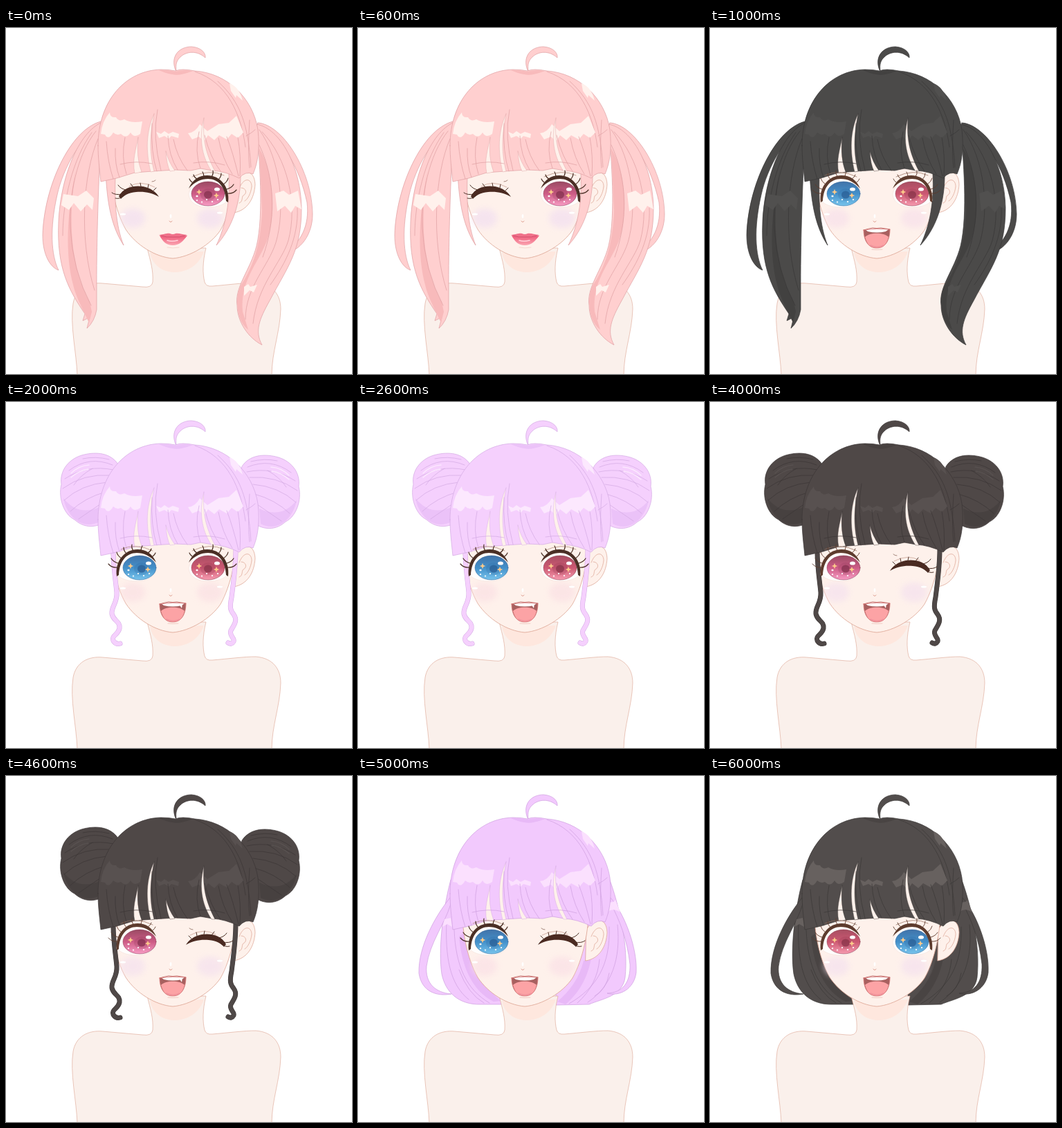
Recreate the animation shown at these times as an HTML page. Size 500 by 500 pixels, loop 7 s.

```html
<!DOCTYPE html>
<html lang="en">
<head>
<meta charset="utf-8">
<title>Character looks</title>
<style>
html, body { margin: 0; width: 100%; height: 100%; overflow: hidden; background: #fff; }
svg { display: block; width: 500px; height: 500px; }
.look { visibility: hidden; }
</style>
</head>
<body>
<svg id="stage" viewBox="0 0 500 500" stroke-linecap="round" stroke-linejoin="round"></svg>
<script>
const STEP = 1000;
const SKIN = '#fef1eb', EDGE = '#dca391';

// base, shade, line, shine
const HAIR = {
  pink: ['#ffcfcf', '#f8babb', '#dfa0a3', '#fff1ec'],
  black: ['#4b4a49', '#424140', '#383737', '#51504f'],
  lilac: ['#f5d0fd', '#ebc2f8', '#d3aae3', '#fce8fe'],
  blue: ['#b5daff', '#a3cffa', '#8ab5dd', '#d6ebff'],
  brown: ['#4f4847', '#474140', '#3b3635', '#585150'],
  violet: ['#f2c9fd', '#e8b9f7', '#cea0e0', '#fbe0fe'],
  soft: ['#524d4c', '#494443', '#3c3837', '#67615f']
};
// top, middle, bottom, pupil
const IRIS = {
  pink: ['#9a4a63', '#cd5c86', '#f79cc4', '#84324f'],
  red: ['#a84e62', '#cc5872', '#f69bb0', '#883449'],
  blue: ['#4173a9', '#4390ca', '#78c4ec', '#2b5f96'],
  purple: ['#7c4c98', '#a96bc4', '#e0b0f3', '#66387f']
};
const LOOKS = [
  { hair: 'pink', style: 'tails', left: '', right: 'pink', cheek: '#f3e0f0' },
  { hair: 'black', style: 'tails', left: 'blue', right: 'red', open: 1, fine: 1, cheek: '#f8e1ea' },
  { hair: 'lilac', style: 'buns', left: 'blue', right: 'red', open: 1, fang: 1, cheek: '#fbe1e4' },
  { hair: 'blue', style: 'bob', left: 'red', right: 'purple', cheek: '#fbe1e6' },
  { hair: 'brown', style: 'buns', left: 'pink', right: '', open: 1, fang: 1, fine: 1, cheek: '#f5e2ee' },
  { hair: 'violet', style: 'bob', left: 'blue', right: '', open: 1, cheek: '#fbe1e6' },
  { hair: 'soft', style: 'bob', left: 'red', right: 'blue', open: 1, fine: 1, cheek: '#f5e2ee' }
];

const shape = (d, fill, stroke = 'none', w = .7) =>
  `<path d="${d}" fill="${fill}" stroke="${stroke}" stroke-width="${w}"/>`;
const line = (d, stroke, w = .7) => shape(d, 'none', stroke, w);
const oval = (x, y, rx, ry, fill, extra = '') =>
  `<ellipse cx="${x}" cy="${y}" rx="${rx}" ry="${ry}" fill="${fill}" ${extra}/>`;
const flip = (s, on, axis = 481) => on ? `<g transform="matrix(-1 0 0 1 ${axis} 0)">${s}</g>` : s;
const star = (x, y, r) =>
  shape(`M${x},${y - r}l1.2,${r - 1.2} ${r - 1.2},1.2 ${1.2 - r},1.2 -1.2,${r - 1.2} -1.2,${1.2 - r} ${1.2 - r},-1.2 ${r - 1.2},-1.2z`, '#fbc98a');

function body() {
  return shape('M103,502C102,470 92,428 97,398C101,376 119,367 140,369L197,374Q211,376 212,367C213,350 209,338 204,318H289C284,338 284,355 287,367Q289,374 298,373C322,371 344,368 361,368C386,370 397,386 397,406C396,440 384,468 384,502Z', '#faf0eb', EDGE, .6) +
    shape('M208,325C213,346 229,353 245,353C264,352 279,342 286,323Z', '#fee7de');
}

function face(look) {
  const ear = shape('M330,222C340,205 359,202 360,226C359,246 349,264 329,267Z', SKIN, EDGE) +
    line('M337,232C344,214 355,218 355,229C354,239 349,248 345,250M340,231C347,231 349,239 343,242C340,244 343,251 337,253', EDGE);
  const cheek = (x, rx) => oval(x, 275, rx, 14, look.cheek, 'filter="url(#blur)" opacity=".75"');
  return ear +
    shape('M150,180C150,225 157,262 173,291C188,314 216,331 241,333C266,331 296,313 310,292C325,265 334,225 334,180Z', SKIN, EDGE, .8) +
    cheek(183, 18) + cheek(295, 19) +
    oval(169, 269, 4, 1.5, '#fff') + oval(309, 267, 4, 1.5, '#fff') +
    oval(238, 272, 1.4, 3, '#fff') + line('M236,279Q238,282 240,279', '#e0a294', 1);
}

function mouth(look) {
  if (!look.open) {
    return shape('M222,300Q241,304 262,300C255,309 250,314 241,314C232,314 227,309 222,300Z', 'url(#lip)') +
      shape('M221,299C230,298 233,296 237,297Q241,299 245,297C250,296 255,299 262,299Q252,304 241,303Q230,304 221,299Z', '#f0718a') +
      line('M224,300Q232,303 241,302Q251,303 259,300', '#cf4a68', .9) +
      line('M233,307Q239,309 248,307', '#ffd6de', 1.6) +
      line('M233,317Q241,319 250,317', '#f1cfc5');
  }
  const d = 'M222,292Q241,289 260,291C260,304 255,318 241,318C228,318 222,306 222,292Z';
  return shape(d, '#a8605f') +
    shape('M224,302C231,295 251,295 258,302C255,314 250,318 241,318C232,318 227,313 224,302Z', '#fca3a5') +
    shape('M224,291Q241,287 258,291L254,294Q241,297 228,294Z', '#fff') +
    (look.fang ? shape('M250,292L255,291 254,298Z', '#fff') : '') +
    line('M222,292Q229,290 235,289Q241,290 247,289Q254,290 260,291', '#c0625f', 1) +
    line(d, '#d87a7a', .8) +
    line('M232,314Q241,319 251,314', '#f0929b', 1.6) + line('M234,320Q241,321 249,320', '#eab9b0');
}

function iris(color, x, pupil) {
  const dark = IRIS[color][3];
  const dots = [-16, -9, -2, 6, 14].map((dx, i) => oval(x + dx, 249 + [0, 2.5, -1, 2, -1][i], 1.2, 1.1, '#fff')).join('');
  return oval(x, 239.5, 24, 17.5, `url(#${color}Iris)`, `stroke="${dark}" stroke-width=".5"`) +
    oval(pupil, 241, 11, 9, dark, 'opacity=".2"') + oval(pupil, 241, 6, 5.5, dark, 'opacity=".75"') +
    star(x - 13, 237, 4.2) + star(x + 12, 242, 4.2) +
    oval(x + 13, 233, 4, 2.6, '#fff') + oval(x - 16, 243, 1.6, 1.3, '#fff') + dots;
}

function eye(color, right, fine) {
  const ink = fine ? '#5d3c2e' : '#4a2f25', w = fine ? .9 : 1.2;
  if (!color) {
    return flip(
      shape('M163,243C170,230 185,227 198,229C209,231 217,237 221,244C211,238 200,236 188,237C177,238 170,242 166,247Z', '#4a2a21') +
      line('M178,229Q195,219 215,230', '#c39a8c') +
      line('M168,240Q158,242 153,238M171,242Q164,248 158,246M174,234Q166,233 162,227M184,230L180,225M195,229L194,224M205,231L206,226M213,235L217,231', '#4a2f25', 1) +
      line('M211,222Q214,222 216,220', '#7b5548'), right);
  }
  const white = shape('M160,249C161,228 174,218 190,218C205,218 215,228 217,240C216,254 202,259 190,259C176,259 166,256 160,249Z', '#fffdfc', '#f3e0d9', .6);
  const lid = shape('M160,252C157,229 172,213 190,213C203,213 212,220 217,232C208,222 199,218 189,218C174,218 164,230 163,250Z', ink) +
    line('M166,213Q187,203 212,215', fine ? '#96705f' : '#a98475') +
    line('M161,239Q153,240 148,234M162,233Q155,231 152,226M167,226Q161,222 160,217M174,219Q170,215 170,210M184,215Q181,211 182,206M195,215Q195,211 197,208M205,218Q209,216 210,212M212,223Q215,221 216,218', ink, w);
  return flip(white, right) +
    (right ? iris(color, 292, 292) : iris(color, 193, 196)) + flip(lid, right);
}

const back = {
  bob([base, shade, edge, shine]) {
    return shape('M134,150C122,195 116,252 121,286C126,311 144,331 178,330L210,330V170H286V331L334,330C352,322 382,319 386,291C391,246 378,188 362,145Z', base, edge) +
      shape('M133,176C111,203 87,247 88,285C92,312 114,319 135,315C112,313 97,300 99,275C104,240 125,215 134,185Z', base, edge) +
      shape('M365,176C386,200 404,250 402,284C399,308 378,319 360,314C382,313 394,299 393,272C389,236 378,208 365,184Z', base, edge) +
      shape('M146,232C150,280 168,312 196,326L206,325C172,294 158,260 156,225ZM326,267C320,292 306,311 288,326L300,330C323,310 332,288 337,264Z', shade) +
      line('M128,210C126,260 132,301 160,323M139,222C141,275 157,309 190,328M146,280Q159,315 182,328M375,215C380,263 367,304 332,327M363,218C365,273 345,306 305,329M349,265Q346,302 317,328M363,285Q359,309 342,318', edge) +
      shape('M125,207L134,205 136,218 129,214 122,218ZM360,182Q369,184 372,179L379,197Q369,190 361,196Z', shine);
  },
  buns([base, shade, edge, shine]) {
    const bun = shape('M162,90C151,73 130,72 113,76C91,81 77,99 80,119C75,139 84,163 99,170C111,181 127,183 142,174L166,122Z', base, edge) +
      shape('M83,139C98,158 116,161 137,151L135,173C111,186 88,166 83,139Z', shade) +
      line('M154,91Q120,77 91,99M155,98Q117,90 85,111M151,106Q112,103 82,125M146,116Q109,119 84,142M144,130Q114,138 93,158M143,143Q121,158 105,169M149,83Q129,78 111,82M125,96Q107,106 98,120', edge) +
      line('M94,103Q105,92 120,91M94,109Q105,99 119,97', shine, 1.5);
    return bun + `<g transform="translate(0 3)">${flip(bun, true, 503)}</g>`;
  },
  tails([base, shade, edge, shine]) {
    return shape('M137,135C92,147 55,230 53,299C53,328 64,346 76,350C65,328 63,289 74,241C83,201 108,158 137,140Z', base, edge) +
      shape('M139,136C104,151 79,216 76,280C73,348 91,379 114,413L111,423 121,418 117,434Q128,424 131,407L131,370C131,300 134,222 136,180Z', base, edge) +
      shape('M101,205C89,275 93,345 121,396L124,410 120,426C108,400 101,388 97,371C86,330 87,270 101,205Z', shade) +
      line('M130,149C102,184 91,242 93,289Q96,350 123,401M133,160C111,211 105,306 128,379M124,151C96,190 82,250 82,300', edge) +
      shape('M83,240L104,243 116,235 127,246 125,263 117,255 108,265 98,253 91,263 80,256Z', shine) +
      shape('M364,137C399,139 442,205 443,269C443,299 425,323 403,325C426,310 439,286 435,252C424,201 399,158 364,141Z', base, edge) +
      shape('M362,139C397,145 426,201 427,260C427,322 407,345 381,394C366,421 359,438 370,458C350,448 334,424 334,401C330,374 353,350 362,315C373,270 366,188 362,139Z', base, edge) +
      shape('M366,174C388,211 391,275 376,310C363,342 338,366 342,410L350,436C334,424 330,394 338,374C358,345 368,312 370,264Z', shade) +
      line('M366,147C397,190 404,262 390,310C379,345 346,374 346,421M370,150C407,188 422,255 408,307C399,338 363,371 357,427M366,169C391,222 389,282 371,331M421,260C423,302 405,339 382,371', edge) +
      shape('M389,239L401,235 409,241 422,235 427,262 418,257 412,267 403,257 392,265ZM344,374L350,370 353,374 363,371 358,382 352,379 344,387Z', shine);
  }
};

const curl = (d, [base, , edge]) => line(d, edge, 7) + line(d, base, 6);

const locks = {
  bob: () => '',
  tails: ([base, , edge]) =>
    shape('M144,207C146,255 153,288 170,314C158,284 157,249 158,213Z', base, edge) +
    shape('M339,208C340,252 327,289 304,314C318,285 324,250 322,211Z', base, edge),
  buns: hair =>
    curl('M155,215C155,240 159,262 160,275C161,291 152,295 153,306C155,317 165,316 164,327C162,337 152,337 155,345Q159,351 165,349', hair) +
    curl('M332,212C332,240 328,265 326,282C323,297 324,301 329,307C335,315 330,322 325,330C322,338 331,341 329,346Q326,351 321,348', hair)
};

function crown([base, shade, edge, shine]) {
  return shape('M133,170C133,104 174,61 224,60Q236,60 245,62Q253,58 273,62C319,65 357,101 364,147C367,174 364,195 357,211Q346,206 337,217Q317,207 298,206L281,203 267,206 244,205 212,207 186,209 160,217 137,222C135,202 133,188 133,170Z', base, edge) +
    shape('M221,61Q237,61 245,63Q254,60 270,62Q250,70 240,67Q232,66 221,61Z', shade) +
    line('M273,63C321,79 340,126 346,172M306,77C339,107 350,139 354,201M352,133Q349,177 352,202', edge) +
    shape('M150,122Q150,130 159,129Q163,136 171,132Q181,138 197,135L194,153Q185,160 180,151Q174,161 166,153Q160,156 155,151Q148,163 143,154L137,153Q139,134 150,122Z', shine) +
    shape('M217,150L224,153 229,149 235,153 241,150 250,153 249,159 239,156 235,160 229,156 221,159ZM263,152Q274,151 280,139L291,149 307,139 322,137 333,127 343,151 335,159 326,153 319,161 308,155 301,162 292,155 286,164 279,157 269,161Z', shine) +
    shape('M323,80Q337,85 342,105L333,97 332,101 325,91Z', shine) +
    shape('M191,158C188,175 182,190 186,210L196,208Q188,188 191,158ZM214,124C202,150 202,178 209,208L214,207C206,175 209,150 214,124ZM231,178Q232,197 237,207L244,206Q235,194 231,178ZM286,130C277,165 286,190 297,207L302,207C288,180 284,160 286,130Z', SKIN, edge, .4) +
    line('M158,174Q157,197 164,216M172,158Q166,187 174,211M145,164Q147,194 155,218M219,118Q211,157 224,206M211,138Q209,180 218,207M234,156Q235,184 248,205M242,161Q247,186 262,206M279,150Q272,178 281,203M287,155Q295,187 310,207M307,159Q312,188 327,211M319,157Q328,180 336,214M335,158Q340,185 338,214M347,156Q356,151 360,147', edge) +
    line('M165,197Q188,191 211,196M271,195Q293,191 316,198', edge);
}

const tuft = ([base, , edge]) =>
  shape('M245,61C237,41 250,27 268,27C282,28 289,36 288,43C276,32 261,34 253,41C246,47 245,53 246,61Z', base, edge);

function draw(look) {
  const hair = HAIR[look.hair], rear = back[look.style](hair), bob = look.style === 'bob';
  return `<g class="look">${bob ? rear : ''}${body()}${bob ? '' : rear}${face(look)}${mouth(look)}` +
    locks[look.style](hair) + crown(hair) + tuft(hair) +
    eye(look.left, false, look.fine) + eye(look.right, true, look.fine) + '</g>';
}

const fade = (id, colors) => `<linearGradient id="${id}" x2="0" y2="1">` +
  colors.map((c, i) => `<stop offset="${i / (colors.length - 1)}" stop-color="${c}"/>`).join('') + '</linearGradient>';

const stage = document.getElementById('stage');
stage.innerHTML = '<defs><filter id="blur" x="-50%" y="-50%" width="200%" height="200%"><feGaussianBlur stdDeviation="4"/></filter>' +
  fade('lip', ['#ee5878', '#fba6b2']) +
  Object.entries(IRIS).map(([name, c]) => fade(name + 'Iris', c.slice(0, 3))).join('') +
  '</defs>' + LOOKS.map(draw).join('');

const views = [...stage.querySelectorAll('.look')];
const start = performance.now();

function tick() {
  const now = Math.floor((performance.now() - start) / STEP) % views.length;
  views.forEach((v, i) => { v.style.visibility = i === now ? 'visible' : 'hidden'; });
  requestAnimationFrame(tick);
}
tick();
</script>
</body>
</html>
```
